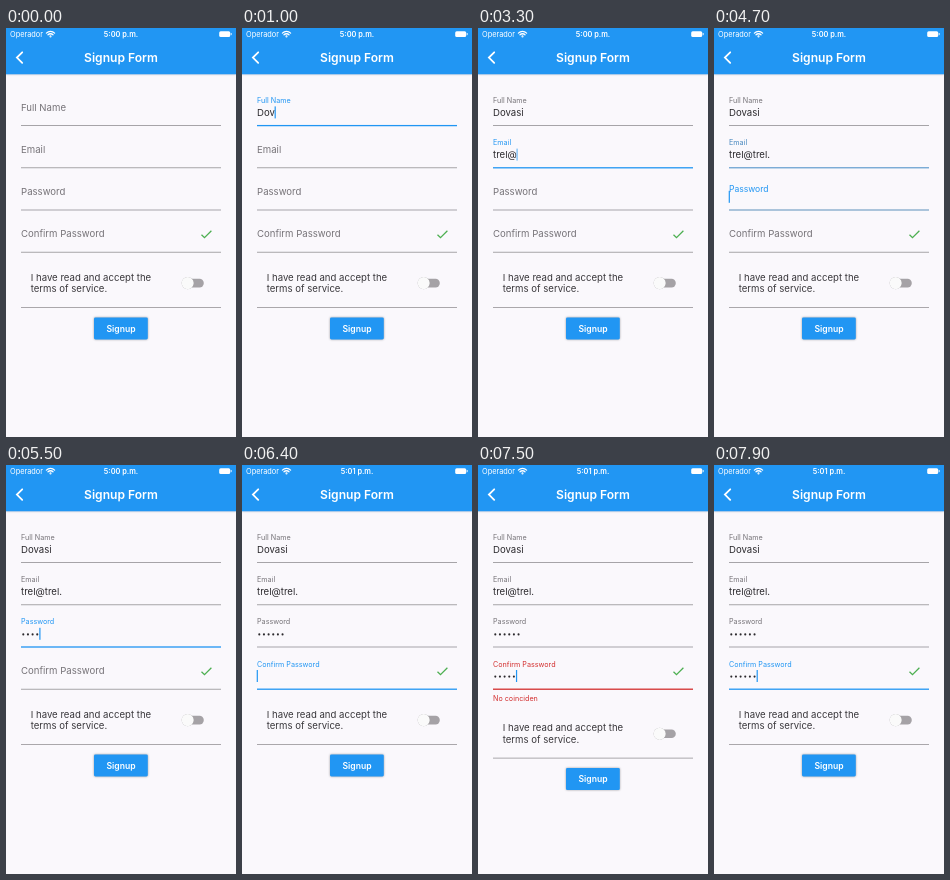
Recreate the animation shown at these times as an HTML page. Size 230x409 px, loop 8 s.

```html
<!DOCTYPE html>
<html lang="en">
<head>
<meta charset="utf-8">
<title>Signup Form</title>
<style>
  html, body { margin: 0; width: 100%; height: 100%; overflow: hidden; background: #faf8fc; }
  svg { display: block; width: 230px; height: 409px; font: 9.6px Inter, Roboto, sans-serif; }
  .status { font-size: 7.36px; fill: #fff; }
  .bold { font-weight: 600; fill: #fff; }
  .mid { text-anchor: middle; }
  .bar { filter: drop-shadow(0 .8px .9px rgba(0, 0, 0, .22)); }
  .btn { filter: drop-shadow(0 .9px .9px rgba(0, 0, 0, .36)); }
  .thumb { filter: drop-shadow(0 .7px .7px rgba(0, 0, 0, .35)); }
  .line { fill: none; stroke: #fff; stroke-linecap: round; }
</style>
</head>
<body>
<svg viewBox="0 0 230 409">
  <rect width="230" height="409" fill="#faf8fc"/>
  <rect class="bar" width="230" height="46.3" fill="#2196f3"/>

  <text class="status" x="4" y="8.8">Operador</text>
  <g class="line" stroke-width="1.3" stroke-linecap="butt">
    <path d="M40.4 5.1a5.8 5.8 0 0 1 8.2 0M42 6.8a3.5 3.5 0 0 1 5 0"/>
    <circle cx="44.5" cy="8.4" r=".4"/>
  </g>
  <text class="status bold mid" id="clock" x="115" y="8.8"></text>
  <rect x="213.2" y="3.3" width="11" height="5.6" rx="1.5" fill="#fff"/>
  <rect x="224.7" y="5" width=".9" height="2.2" rx=".4" fill="#fff"/>

  <path class="line" stroke-width="1.8" d="M16.2 24.3L10.9 29.6L16.2 34.9"/>
  <text class="bold mid" x="115" y="33.9" font-size="12.1">Signup Form</text>

  <g id="fields"></g>
  <path d="M195.5 206.7l3 3l6.9-6.9" fill="none" stroke="#4caf50" stroke-width="1.25"/>
  <text id="error" x="15" y="236.1" font-size="7.2" fill="#d32f2f">No coinciden</text>

  <g id="lower">
    <g fill="#39373b">
      <text x="24.7" y="252.5">I have read and accept the</text>
      <text x="24.7" y="264.4">terms of service.</text>
    </g>
    <rect x="177.6" y="250.8" width="20.2" height="8.6" rx="4.3" fill="#a5a2a6"/>
    <circle class="thumb" cx="181.7" cy="255.1" r="6.1" fill="#fafafa"/>
    <rect x="15" y="279" width="200" height=".8" fill="#969498"/>
    <rect class="btn" x="88" y="289.4" width="53.8" height="22" rx="1.3" fill="#2196f3"/>
    <text class="bold mid" x="115" y="303.5" font-size="8.6">Signup</text>
  </g>
</svg>
<script>
  const LOOP = 8000, FADE = 200, ERR_ON = 6500, ERR_OFF = 7600;
  const GREY = [118, 115, 120], RULE = [146, 144, 148], BLUE = [33, 150, 243], RED = [211, 47, 47];
  const $ = id => document.getElementById(id);
  const clamp = v => Math.max(0, Math.min(1, v));
  const ease = v => v * v * (3 - 2 * v);
  const ramp = (t, start) => ease(clamp((t - start) / FADE));
  const lerp = (a, b, k) => a + (b - a) * k;
  const mix = (a, b, k) => a.map((v, i) => lerp(v, b[i], k));
  const rgb = c => `rgb(${c.map(Math.round)})`;

  function add(parent, tag, attrs, text = '') {
    const el = document.createElementNS('http://www.w3.org/2000/svg', tag);
    set(el, attrs);
    el.textContent = text;
    return parent.appendChild(el);
  }
  function set(el, attrs) {
    for (const k in attrs) el.setAttribute(k, attrs[k]);
  }

  // value: null means hidden characters
  const fields = [
    { label: 'Full Name', value: 'Dovasi', from: 300, to: 1500, keys: [700, 800, 1000, 1100, 1200, 1300] },
    { label: 'Email', value: 'trel@trel.', from: 1500, to: 4610,
      keys: [1700, 1800, 2000, 2100, 2900, 3700, 3900, 4200, 4300, 4500] },
    { label: 'Password', value: null, from: 4610, to: 6200, keys: [4900, 5100, 5300, 5500, 5800, 5900] },
    { label: 'Confirm Password', value: null, from: 6200, to: 1e5, keys: [6500, 6700, 7100, 7300, 7400, 7600] }
  ];

  fields.forEach((f, i) => {
    const g = add($('fields'), 'g', { transform: `translate(15 ${i * 42.2})` });
    f.rule = add(g, 'rect', { width: 200 });
    f.name = add(g, 'text', {}, f.label);
    if (f.value) f.text = add(g, 'text', { y: 87.9, fill: '#2b292d' });
    else f.dots = f.keys.map((_, n) =>
      add(g, 'circle', { cx: 2.3 + n * 4.65, cy: 85, r: 1.05, fill: '#2b292d' }));
    f.caret = add(g, 'rect', { y: 78.4, width: 1.2, height: 12, fill: '#2196f3' });
  });

  // Solid after a key press, then soft blinking
  function blink(age) {
    const p = (age + 700) % 1000;
    if (age < 300) return 1;
    return p < 500 ? 1 - ease(clamp(p / 250)) : ease(clamp((p - 500) / 250));
  }

  function drawField(f, t, bad) {
    const up = ramp(t, f.from);
    const lit = up * (1 - ramp(t, f.to));
    const accent = mix(BLUE, RED, bad);
    const h = lerp(.8, 1.3, lit);
    set(f.rule, { y: 97.6 - h / 2, height: h, fill: rgb(mix(RULE, accent, lit)) });
    set(f.name, {
      transform: `translate(0 ${lerp(82.6, 74.9, up)}) scale(${lerp(1, .75, up)})`,
      fill: rgb(mix(GREY, accent, Math.max(lit, clamp((t - f.from) / 80) * (t < f.to))))
    });

    const typed = f.keys.filter(k => k <= t);
    const n = typed.length;
    let end = n * 4.65;
    if (f.value) {
      f.text.textContent = f.value.slice(0, n);
      end = n ? f.text.getComputedTextLength() : 0;
    } else {
      f.dots.forEach((d, i) => set(d, { opacity: i < n ? 1 : 0 }));
    }
    const active = t >= f.from && t < f.to;
    set(f.caret, { x: end - .3, opacity: active ? blink(t - (typed[n - 1] || f.from)) : 0 });
  }

  function draw(t) {
    const bad = ramp(t, ERR_ON) * (1 - ramp(t, ERR_OFF));
    fields.forEach((f, i) => drawField(f, t, i === 3 ? bad : 0));
    const open = t >= ERR_ON && t < ERR_OFF + FADE;
    set($('error'), { opacity: bad, transform: `translate(0 ${(bad - 1) * 2})` });
    set($('lower'), { transform: `translate(0 ${open ? 13.7 : 0})` });
    $('clock').textContent = t < 5800 ? '5:00 p.m.' : '5:01 p.m.';
  }

  const start = performance.now();
  function tick() {
    draw((performance.now() - start) % LOOP);
    requestAnimationFrame(tick);
  }
  tick();
</script>
</body>
</html>
```
